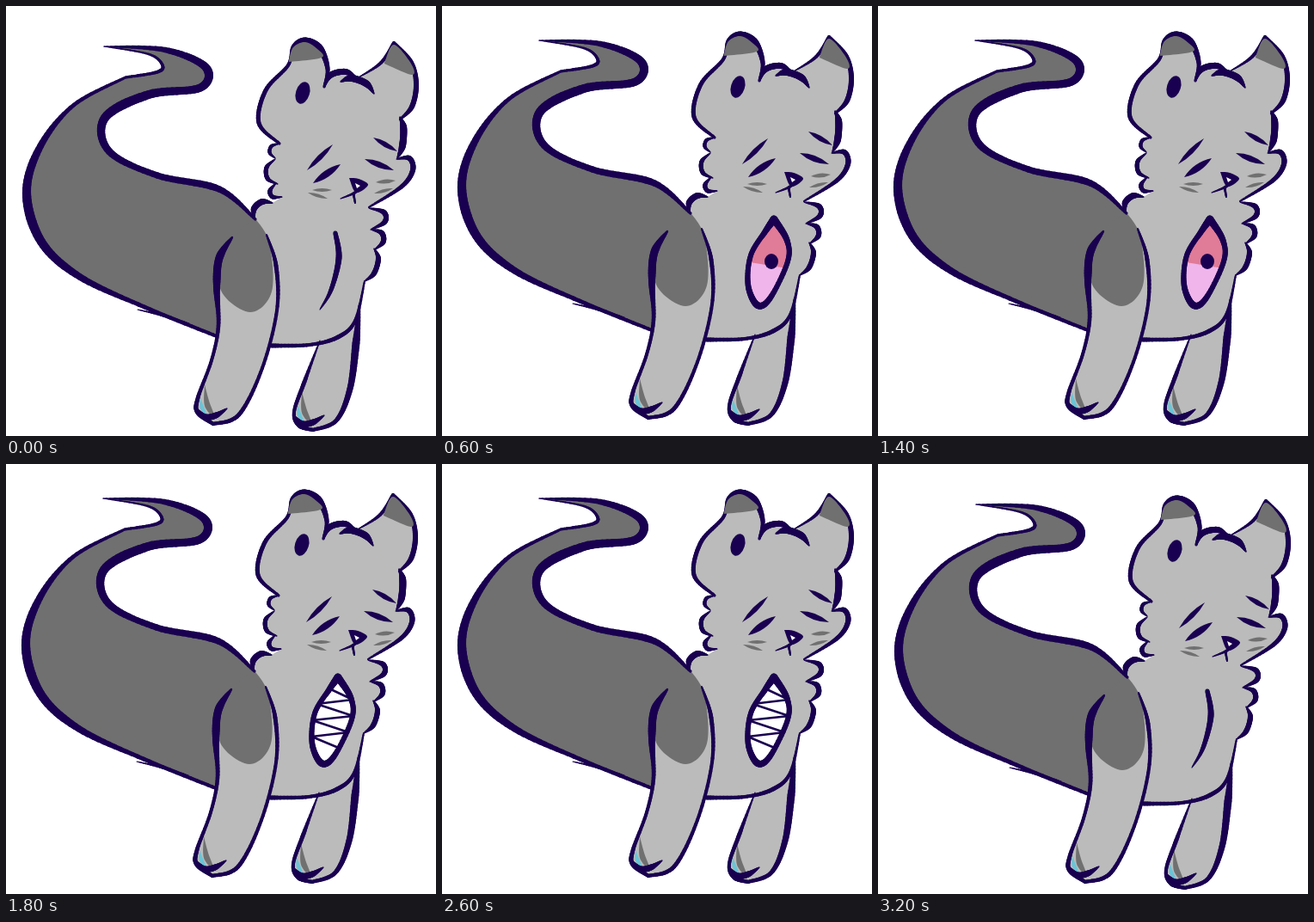
Write an HTML page with a canvas that moves like this. It is 500 by 500 pixels and loops after 3.4 s.

```html
<!DOCTYPE html>
<html lang="en">
<head>
<meta charset="utf-8">
<title>Cat with a chest eye</title>
<style>
html, body { margin: 0; width: 100%; height: 100%; overflow: hidden; background: #fff; }
canvas { display: block; width: 100vw; height: 100vh; }
</style>
</head>
<body>
<canvas id="stage" width="500" height="500"></canvas>
<script>
const ctx = document.getElementById('stage').getContext('2d');
const NAVY = '#1a0050', DARK = '#707070', LIGHT = '#bbbbbb', TEAL = '#69c5d6';
const ROSE = '#e07b98', PINK = '#f0b5eb', WHITE = '#fff';

// Catmull-Rom curve through x, y pairs
function curve(...xy) {
  const pts = [];
  for (let i = 0; i < xy.length; i += 2) pts.push([xy[i], xy[i + 1]]);
  const last = pts.length - 1, at = i => pts[Math.max(0, Math.min(last, i))];
  const out = [pts[0]];
  for (let i = 0; i < last; i++) {
    const [a, b, c, d] = [at(i - 1), at(i), at(i + 1), at(i + 2)];
    for (let s = 1; s <= 12; s++) {
      const t = s / 12;
      out.push(b.map((v, k) => v + t / 2 * (c[k] - a[k] +
        t * (2 * a[k] - 5 * v + 4 * c[k] - d[k] + t * (3 * (v - c[k]) + d[k] - a[k])))));
    }
  }
  return out;
}

// A brush line whose width runs evenly through the given widths
const line = (widths, ...xy) => ({ widths, pts: curve(...xy) });

// One lock of fur: an arc bulging to the outside of a clockwise contour
function tuft(x1, y1, x2, y2, bulge, width) {
  const dx = x2 - x1, dy = y2 - y1, k = bulge / Math.hypot(dx, dy);
  const mid = t => [x1 + dx * t + dy * k, y1 + dy * t - dx * k];
  return line([1, width, width, 1], x1, y1, ...mid(.25), ...mid(.7), x2, y2);
}

function ink(...lines) {
  ctx.strokeStyle = NAVY;
  ctx.lineCap = 'round';
  for (const { widths, pts } of lines) {
    for (let i = 1; i < pts.length; i++) {
      const u = (i - .5) / (pts.length - 1) * (widths.length - 1), n = Math.floor(u);
      ctx.lineWidth = widths[n] + (widths[n + 1] - widths[n]) * (u - n);
      ctx.beginPath();
      ctx.moveTo(...pts[i - 1]);
      ctx.lineTo(...pts[i]);
      ctx.stroke();
    }
  }
}

function fill(color, pts) {
  ctx.beginPath();
  pts.forEach(p => ctx.lineTo(...p));
  ctx.closePath();
  ctx.fillStyle = color;
  ctx.fill();
}

const fillLines = (color, ...lines) => fill(color, lines.flatMap(l => l.pts));

function oval(x, y, rx, ry, turn) {
  ctx.beginPath();
  ctx.ellipse(x, y, rx, ry, turn, 0, 7);
  ctx.fillStyle = NAVY;
  ctx.fill();
}

function leaf(color, x1, y1, x2, y2, width) {
  const dx = x2 - x1, dy = y2 - y1, k = width / Math.hypot(dx, dy);
  const mx = (x1 + x2) / 2, my = (y1 + y2) / 2;
  ctx.beginPath();
  ctx.moveTo(x1, y1);
  ctx.quadraticCurveTo(mx - dy * k, my + dx * k, x2, y2);
  ctx.quadraticCurveTo(mx + dy * k, my - dx * k, x1, y1);
  ctx.fillStyle = color;
  ctx.fill();
}

const tail = [
  line([1, 7, 10, 9, 11, 9, 7, 8, 3], 113,40, 184,44, 231,64, 225,88, 165,96, 114,123, 119,162,
    175,190, 247,206, 289,241),
  line([4, 5, 9, 11, 9, 5, 3], 244,377, 160,343, 85,308, 40,267, 23,210, 39,156, 78,108, 138,76),
  line([3, 4, 3, 1], 138,76, 174,70, 181,62, 165,49, 113,40)];
const neck = tuft(288,240, 309,222, 9, 7);
const ruffs = [
  tuft(320,215, 313,199, 10, 5),
  tuft(315,200, 312,171, 11, 5),
  tuft(312,170, 317,153, 8, 4)];
const earLeft = line([3, 5, 5, 4, 4, 7, 8, 5, 3], 317,153, 293,129, 301,91, 327,62, 333,40, 347,33,
  364,42, 373,66, 369,87);
const bangs = [tuft(369,87, 409,79, 12, 7), tuft(388,81, 427,95, 8, 8)];
const earRight = [
  line([1, 4, 4], 409,76, 435,59, 450,36),
  line([4, 5, 6, 6, 2], 450,36, 470,58, 476,84, 471,110, 457,125)];
const cheeks = [
  tuft(457,122, 454,170, 5, 8),
  line([1, 6, 6, 5, 2], 453,171, 468,170, 472,184, 459,203, 421,227)];
const chest = [
  tuft(421,228, 423,253, 17, 6),
  tuft(424,253, 428,276, 11, 6),
  tuft(427,275, 416,313, 8, 6)];
const belly = line([2, 4, 5, 4, 5], 416,313, 405,359, 385,378, 352,387, 307,388);
const legFar = [
  line([1, 5, 4, 5, 4], 364,382, 346,430, 334,465, 340,481, 356,486),
  line([4, 5, 7, 9, 2], 356,486, 383,475, 399,438, 406,385, 410,340)];
const legNear = [
  line([2, 9, 9, 5, 4, 4, 5, 5, 4], 262,262, 247,286, 244,320, 246,365, 238,405, 222,449, 222,466,
    240,479),
  line([4, 5, 4, 4, 5, 2], 240,479, 270,468, 297,414, 314,347, 313,295, 302,259)];

// Both paws share their stripe, claw and toe line
function paws() {
  for (const side of [0, 1]) {
    ctx.save();
    ctx.translate(side * 113, side * 8);
    fill(DARK, curve(230,433, 230,458, 242,472, 235,452, 230,433));
    fill(TEAL, curve(225,449, 225,461, 233,470, 225,449));
    ink(line([4, 7, 7, 1], 222,464, 231,471, 243,469, 256,461));
    ctx.restore();
  }
}

function face() {
  fill(DARK, curve(328,56, 333,41, 347,35, 361,43, 366,53, 328,58));
  fill(DARK, curve(439,59, 450,38, 470,60, 471,73, 439,60));
  leaf(DARK, 355,207, 378,207, 4);
  leaf(DARK, 350,210, 373,217, 4);
  leaf(DARK, 429,198, 452,196, 5);
  leaf(DARK, 427,211, 449,205, 4);
  oval(344, 94, 8, 13, .3);
  leaf(NAVY, 349,184, 379,154, 6);
  leaf(NAVY, 426,146, 454,162, 6);
  leaf(NAVY, 356,199, 388,177, 8);
  leaf(NAVY, 416,171, 450,184, 7);
  fill(NAVY, curve(398,193, 409,194, 420,201, 406,210, 398,193));
  fill(WHITE, [[405, 199], [411, 202], [407, 205]]);
  ink(line([3, 3, 1], 406,208, 403,211, 388,217), line([3, 2], 403,211, 405,222));
}

function body() {
  fillLines(DARK, ...tail);
  fillLines(LIGHT, ...legFar);
  fillLines(LIGHT, neck, ...ruffs, earLeft, bangs[0], ...earRight, ...cheeks, ...chest, belly);
  fillLines(LIGHT, ...legNear);
  fill(DARK, curve(288,239, 305,268, 308,325, 283,349, 249,324, 250,275, 288,239));
  ink(...tail, line([1, 3, 1], 152,346, 182,353, 212,362));
  paws();
  ink(neck, ...ruffs, earLeft, ...earRight, ...cheeks, ...chest, belly, ...legFar, ...legNear);
  face();
  ink(...bangs);
}

// Chest eye shapes: outline, ends of the colour split, tooth spacing and slant
const half = {
  rim: curve(386,248, 401,272, 402,297, 382,339, 367,348, 356,325, 359,290, 376,262, 386,248),
  split: [[340, 295], [420, 308]],
  top: 260, gap: 19, slant: 14
};
const wide = {
  rim: curve(387,235, 395,248, 411,275, 401,317, 369,348, 351,348, 339,308, 345,270, 380,246, 387,235),
  split: [[330, 275], [420, 308]],
  top: 250, gap: 16, slant: 28
};

// Zigzag from rim to rim
function teeth({ rim, top, gap, slant }) {
  const edge = (y, pick) => pick(...rim.filter(p => Math.abs(p[1] - y) < 7).map(p => p[0]));
  ctx.beginPath();
  for (let y = top; y + slant < 342; y += gap) {
    ctx.lineTo(edge(y, Math.min), y);
    ctx.lineTo(edge(y + slant, Math.max), y + slant);
  }
  ctx.strokeStyle = NAVY;
  ctx.lineWidth = 2.5;
  ctx.lineJoin = 'round';
  ctx.stroke();
}

function opening(shape, toothed) {
  fill(toothed ? WHITE : ROSE, shape.rim);
  ctx.save();
  ctx.clip();
  if (toothed) teeth(shape);
  else fill(PINK, [...shape.split, [420, 370], [320, 370]]);
  ctx.restore();
  ink({ widths: [9, 6, 6, 8, 6, 6, 9], pts: shape.rim });
  if (toothed) return;
  if (shape === half) oval(383, 297, 8, 9, 0);
  else ink(line([3, 5, 1], 383,277, 379,292, 373,315));
}

// Breathing level per step: 0 low and shut, 1 half open, 2 high and wide
const STEP = 200, COUNT = 17, LEVELS = [0, 1, 2, 1], TEETH_FROM = 9;

function draw(step) {
  const level = LEVELS[step % 4];
  ctx.clearRect(0, 0, 500, 500);
  ctx.save();
  ctx.translate(1 - level, 7 - 7 * level);
  body();
  ctx.restore();
  if (level === 0) ink(line([5, 7, 5, 1], 383,264, 387,293, 378,330, 365,353));
  else opening(level === 1 ? half : wide, step >= TEETH_FROM);
}

const start = performance.now();
let shown = -1;
function tick(now) {
  const step = Math.floor(Math.max(0, now - start) / STEP) % COUNT;
  if (step !== shown) draw(shown = step);
  requestAnimationFrame(tick);
}
tick(start);
</script>
</body>
</html>
```
